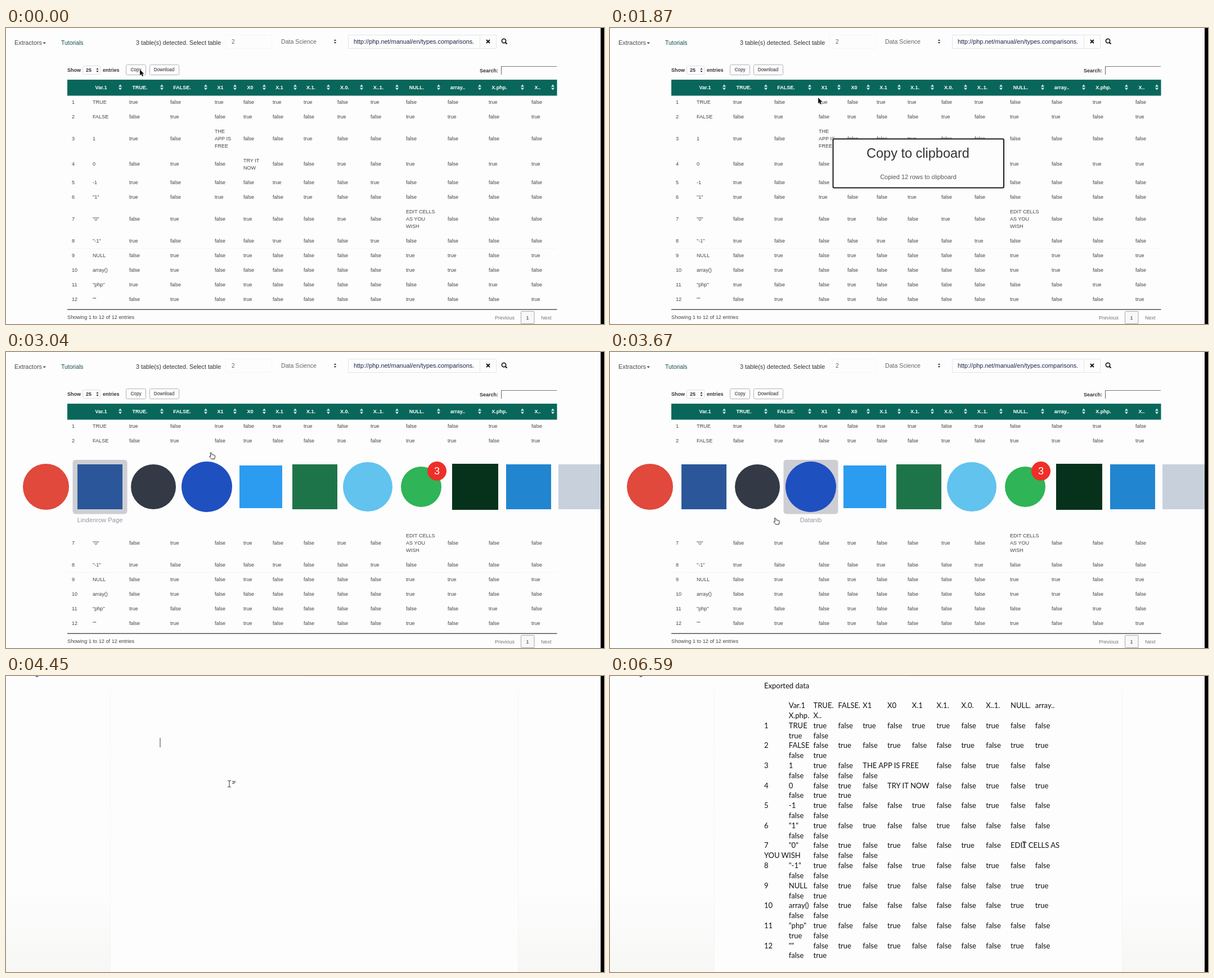
An HTML page with a canvas for the animation above (6.63 s loop, 1063x527 px).

```html
<!DOCTYPE html>
<html lang="en">
<head>
<meta charset="utf-8">
<title>Copy a table into a document</title>
<style>
html, body { margin: 0; width: 100%; height: 100%; overflow: hidden; background: #fdfdfe; }
canvas { display: block; }
</style>
</head>
<body>
<canvas id="stage" width="1063" height="527"></canvas>
<script>
const LOOP = 6630, PAPER = '#fdfdfe', SANS = '"Liberation Sans", Arial, sans-serif';
const ctx = document.getElementById('stage').getContext('2d');

// Table contents: one letter per cell
const words = { t: 'true', f: 'false', A: 'THE APP IS FREE', B: 'TRY IT NOW', C: 'EDIT CELLS AS YOU WISH' };
const cellLines = { A: ['THE', 'APP IS', 'FREE'], B: ['TRY IT', 'NOW'], C: ['EDIT CELLS', 'AS YOU', 'WISH'] };
const heads = 'Var.1 TRUE. FALSE. X1 X0 X.1 X.1. X.0. X..1. NULL. array.. X.php. X..'.split(' ');
const headX = [169, 238, 313, 381, 434, 486, 542, 602, 662, 730, 803, 877, 945];
const sortX = [203, 277, 355, 407, 459, 514, 573, 632, 695, 769, 842, 918, 972];
const cellX = [154, 219, 292, 371, 422, 474, 529, 589, 648, 711, 785, 858, 934];
const rows = [
  ['TRUE', 'tftfttftfftf', 132], ['FALSE', 'ftftfftfttft', 158],
  ['1', 'tfAfftffffff', 197], ['0', 'ftfBfftftftt', 242],
  ['-1', 'tffftfftffff', 275], ['"1"', 'tftfftffffff', 301],
  ['"0"', 'ftftfftfCfff', 340], ['"-1"', 'tffftfftffff', 379],
  ['NULL', 'ftftffffttft', 405], ['array()', 'ftffffffttff', 431],
  ['"php"', 'tfftfffffftf', 457], ['""', 'ftftfffftfft', 483]
];

// App switcher: shape, centre x, half size, colour
const apps = [
  ['circle', 71, 41, '#e0493c'], ['square', 167, 40, '#2b579a'], ['circle', 262, 40, '#333a45'],
  ['circle', 357, 45, '#1f50c0'], ['square', 453, 38, '#2b9cf0'], ['square', 549, 40, '#1e7449'],
  ['circle', 643, 44, '#62c3ee'], ['circle', 738, 36, '#2fb457'], ['square', 834, 41, '#06321c'],
  ['square', 929, 40, '#2186cf'], ['square', 1022, 40, '#c8d0dc']
];
const appNames = { 1: 'Lindenrow Page', 3: 'Datanib' };

// Pointer path: time, x, y
const path = [
  [0, 238, 74], [1000, 238, 74], [1700, 370, 124], [2100, 370, 124], [2300, 370, 125],
  [2850, 370, 125], [3250, 352, 240], [3670, 291, 295], [3960, 170, 250], [4130, 170, 250],
  [4400, 397, 192], [4800, 397, 192], [5200, 438, 188], [5500, 438, 188], [6160, 700, 290],
  [6360, 700, 290], [6590, 736, 300]
];

const clamp = v => Math.max(0, Math.min(1, v));
const ease = v => v * v * (3 - 2 * v);

function pointerAt(t) {
  const i = path.findIndex(p => p[0] > t);
  if (i < 0) return path[path.length - 1].slice(1);
  const [t0, x0, y0] = path[i - 1], [t1, x1, y1] = path[i];
  const k = ease((t - t0) / (t1 - t0));
  return [x0 + (x1 - x0) * k, y0 + (y1 - y0) * k];
}

function text(str, x, y, size, color = '#444', align = 'left', weight = '') {
  ctx.font = `${weight} ${size}px ${SANS}`;
  ctx.textAlign = align;
  ctx.fillStyle = color;
  ctx.fillText(str, x, y + size * 0.35);
}

function rect(x, y, w, h, color) {
  ctx.fillStyle = color;
  ctx.fillRect(x, y, w, h);
}

function box(x, y, w, h, stroke, fill, radius = 0, width = 1) {
  ctx.beginPath();
  ctx.roundRect(x, y, w, h, radius);
  if (fill) { ctx.fillStyle = fill; ctx.fill(); }
  if (stroke) { ctx.strokeStyle = stroke; ctx.lineWidth = width; ctx.stroke(); }
}

function disc(x, y, r, color) {
  ctx.beginPath();
  ctx.arc(x, y, r, 0, 7);
  ctx.fillStyle = color;
  ctx.fill();
}

function line(x0, y0, x1, y1, color, width = 1, dash = []) {
  ctx.setLineDash(dash);
  ctx.beginPath();
  ctx.moveTo(x0, y0);
  ctx.lineTo(x1, y1);
  ctx.strokeStyle = color;
  ctx.lineWidth = width;
  ctx.stroke();
  ctx.setLineDash([]);
}

function sortArrows(x, y, color, w = 3, h = 4) {
  ctx.fillStyle = color;
  for (const d of [-1, 1]) {
    ctx.beginPath();
    ctx.moveTo(x - w, y + d);
    ctx.lineTo(x + w, y + d);
    ctx.lineTo(x, y + d * (h + 1));
    ctx.fill();
  }
}

function drawToolbar() {
  text('Extractors', 15, 26.5, 10.9, '#4a4a50');
  ctx.beginPath();
  ctx.moveTo(65.5, 25.5); ctx.lineTo(71, 25.5); ctx.lineTo(68.2, 28.5);
  ctx.fill();
  text('Tutorials', 98, 26.5, 10.4, '#16504a');
  text('3 table(s) detected. Select table', 231, 26.5, 10.75, '#333');
  box(390.5, 12.5, 82, 24, '#f6f6f8');
  text('2', 401, 24, 10.2, '#666');
  text('Data Science', 489, 24, 10.6, '#666');
  sortArrows(585, 24, '#444', 2.2, 3);
  box(608.5, 12.5, 234, 24, '#dfe6ee');
  text('http://php.net/manual/en/types.comparisons.', 618, 24, 10.9, '#1c2745');
  box(842.5, 12.5, 29, 24, '#e6e6ea');
  line(854, 21, 860, 27, '#222', 2.2);
  line(860, 21, 854, 27, '#222', 2.2);
  ctx.beginPath();
  ctx.arc(885, 23, 3.6, 0, 7);
  ctx.lineWidth = 1.8;
  ctx.stroke();
  line(887.5, 25.5, 890.5, 28.5, '#222', 2.2);
}

function drawTable() {
  drawToolbar();
  text('Show', 109, 75, 9, '#333', 'left', 'bold');
  box(136.5, 67.5, 31, 15, '#dedee2', null, 2);
  text('25', 142, 75, 9, '#333', 'left', 'bold');
  sortArrows(162.5, 75, '#333', 2, 3);
  text('entries', 172, 75, 9, '#333', 'left', 'bold');
  box(213.5, 65.5, 35, 18, '#b4b4b8', null, 2);
  text('Copy', 231, 74, 8.2, '#222', 'center');
  box(255.5, 65.5, 52, 18, '#b4b4b8', null, 2);
  text('Download', 281, 74, 8.2, '#222', 'center');
  text('Search:', 842, 75.5, 9, '#333', 'left', 'bold');
  line(880.5, 83, 880.5, 68.5, '#666');
  line(880, 68.5, 979, 68.5, '#777');

  rect(109, 92, 870.5, 28.5, '#08675a');
  heads.forEach((h, i) => {
    text(h, headX[i], 106, 9, '#fff', 'center', 'bold');
    sortArrows(sortX[i], 105.5, '#d8ebe6');
  });
  rows.forEach(([name, cells, y], i) => {
    text(i + 1, 117, y, 9.1);
    text(name, cellX[0], y, 9.1);
    [...cells].forEach((c, j) => {
      const lines = cellLines[c] || [words[c]];
      lines.forEach((s, k) => text(s, cellX[j + 1], y + (k - (lines.length - 1) / 2) * 13, 9));
    });
  });
  line(109, 392.5, 979, 392.5, '#e4e4e8', 1, [1, 2]);
  line(109, 501.2, 979.5, 501.2, '#555', 1.4);
  text('Showing 1 to 12 of 12 entries', 109, 515, 9.2);
  text('Previous', 869, 515.5, 9, '#77777b');
  box(915.5, 504.5, 23.5, 22, '#a8a8ac', '#f8f8fa', 1);
  text('1', 927, 515.5, 9, '#333', 'center');
  text('Next', 951, 515.5, 9, '#77777b');
}

function drawModal(alpha) {
  if (alpha <= 0) return;
  ctx.globalAlpha = alpha;
  box(396.5, 197.5, 303.5, 87, '#1c1c1e', PAPER, 2, 2);
  text('Copy to clipboard', 547.5, 223, 23.5, '#333', 'center');
  text('Copied 12 rows to clipboard', 548, 265.5, 10.95, '#555', 'center');
  ctx.globalAlpha = 1;
}

function drawSwitcher(selected) {
  rect(18, 172, 1040, 145, PAPER);
  const cx = apps[selected][1];
  box(cx - 48.5, 192, 97, 96.5, null, '#cdced3', 5);
  text(appNames[selected], cx, 299, 11.2, '#98989c', 'center');
  for (const [shape, x, r, color] of apps) {
    if (shape === 'circle') disc(x, 240, r, color);
    else rect(x - r, 240 - r, 2 * r, 2 * r, color);
  }
  disc(766, 212, 17, '#ee2f28');
  text('3', 766, 212, 18, '#fff', 'center');
}

// Tabbed text that wraps at the right margin; returns the end position
function drawPastedText() {
  const tab = 43.8, lead = 17.81, left = 274;
  let y = 17, x = 0;
  ctx.font = '13px Lato, "Open Sans", sans-serif';
  ctx.textAlign = 'left';
  ctx.fillStyle = '#111';
  const put = s => ctx.fillText(s, left + x, y + 4.5);
  put('Exported data');
  y += lead;
  const paragraphs = [['', ...heads], ...rows.map(([name, cells], i) =>
    [String(i + 1), name, ...[...cells].map(c => words[c])])];
  for (const cells of paragraphs) {
    y += lead;
    let col = 0;
    for (const cell of cells) {
      if (col > 11) { col = 1; y += lead; }
      x = col * tab;
      for (const word of cell.split(' ')) {
        const w = ctx.measureText(word).width;
        if (x + w > 535) { x = 0; y += lead; }
        put(word);
        x += w + 3;
      }
      x -= 3;
      col = Math.max(1, Math.ceil(x / tab));
    }
  }
  return [left + x + 0.5, y];
}

function drawDocument(t) {
  for (const [x, w] of [[0, 185], [911, 146]]) {
    const shade = ctx.createLinearGradient(0, 380, 0, 527);
    shade.addColorStop(0, 'rgba(247,247,245,0)');
    shade.addColorStop(1, 'rgb(247,247,245)');
    rect(x, 380, w, 147, shade);
  }
  line(185.5, 24, 185.5, 527, '#ececee', 1, [1, 1]);
  line(910.5, 24, 910.5, 527, '#ececdc', 1, [1, 1]);
  line(530, 0.5, 1057, 0.5, '#ececf0', 1, [2, 1]);
  disc(55, -1, 3, '#4a72b0');
  const caret = t < 4820 ? [274, 118.5] : drawPastedText();
  if ((t - 4300) % 900 < 450)
    line(caret[0], caret[1] - 8.5, caret[0], caret[1] + 8.5, '#444');
}

function drawArrow(x, y) {
  const shape = new Path2D('M0 0V10.5L2.4 8.3 4.2 12 6 11.2 4.3 7.6H7.4Z');
  ctx.save();
  ctx.translate(x, y);
  ctx.strokeStyle = '#fff';
  ctx.lineWidth = 1;
  ctx.stroke(shape);
  ctx.fillStyle = '#111';
  ctx.fill(shape);
  ctx.restore();
}

function drawHand(x, y) {
  const shape = new Path2D('M1.5 1Q2.5-.5 3.5 1L4.5 4 9 5Q10.5 5.5 10 8L9 12H4L0 7.5Q0 6 2.5 7Z');
  ctx.save();
  ctx.translate(x, y);
  ctx.fillStyle = '#fff';
  ctx.fill(shape);
  ctx.strokeStyle = '#222';
  ctx.lineWidth = 1;
  ctx.stroke(shape);
  ctx.restore();
}

function drawBeam(x, y, marked) {
  line(x, y - 5, x, y + 5, '#333');
  for (const d of [-1, 1]) {
    line(x, y + d * 5, x - 3, y + d * 6, '#333');
    line(x, y + d * 5, x + 3, y + d * 6, '#333');
  }
  if (!marked) return;
  line(x + 5, y - 4.5, x + 11, y - 4.5, '#445');
  line(x + 6, y - 2.5, x + 11, y - 2.5, '#445');
  line(x + 5, y - 0.5, x + 9, y - 0.5, '#445');
}

function draw(t) {
  rect(0, 0, 1063, 527, PAPER);
  const [x, y] = pointerAt(t);
  if (t < 4130) {
    drawTable();
    drawModal(Math.min(clamp((t - 820) / 300), clamp((2130 - t) / 200)));
    if (t >= 2140) drawSwitcher(t >= 3080 && t < 3840 ? 3 : 1);
    if (t < 2220) drawArrow(x, y);
    else drawHand(x, y);
  } else {
    drawDocument(t);
    drawBeam(x, y, t < 4820);
  }
  rect(1057, 0, 6, 527, '#000');
}

function tick() {
  draw(performance.now() % LOOP);
  requestAnimationFrame(tick);
}
tick();
</script>
</body>
</html>
```
